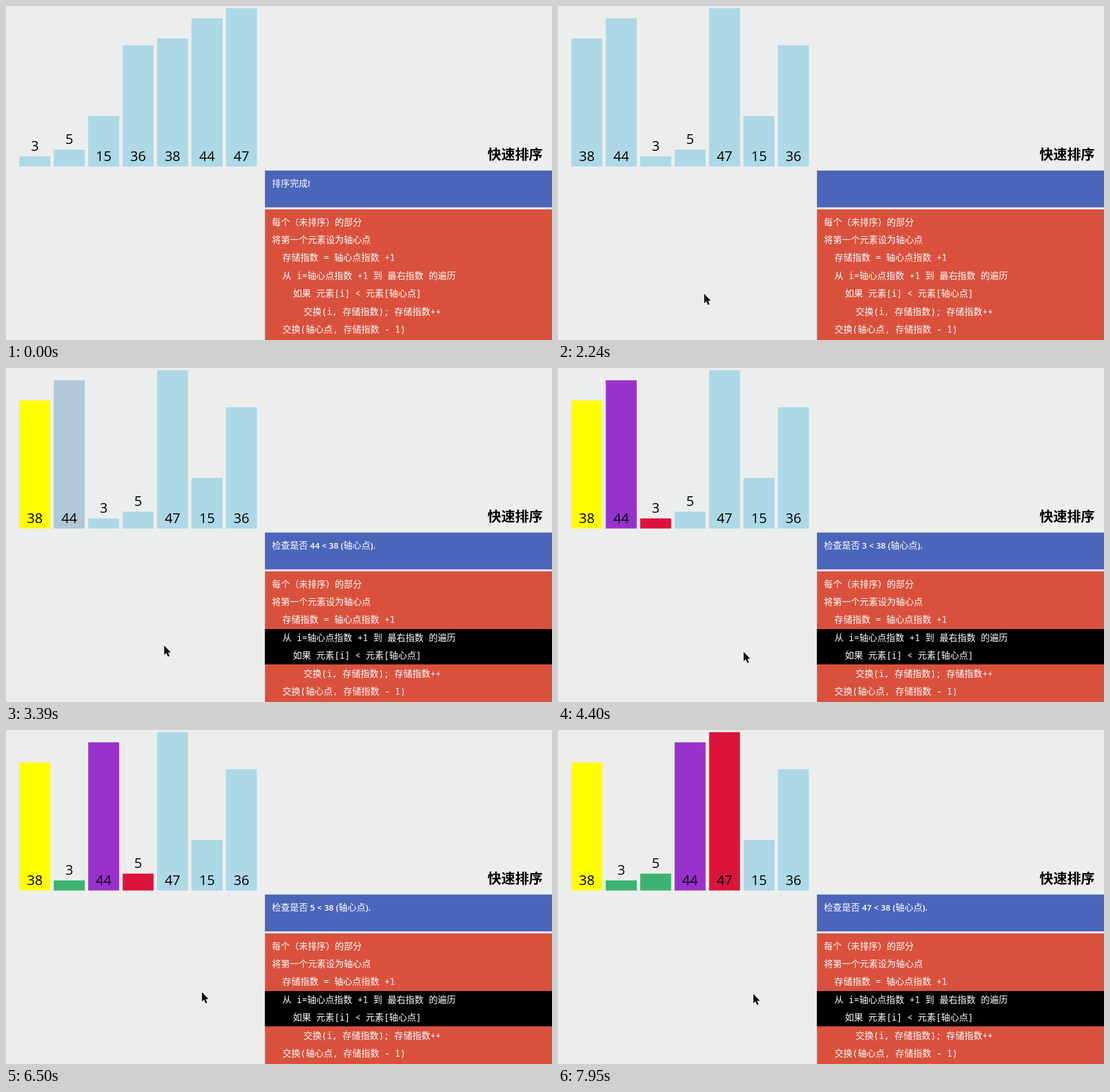
Animation, 956 px wide and 586 px high, one loop 8 s. Source, as an HTML page with a canvas:

```html
<!DOCTYPE html>
<html lang="zh-CN">
<head>
<meta charset="utf-8">
<title>快速排序</title>
<style>
html, body { margin: 0; width: 100%; height: 100%; overflow: hidden; background: #eceeed; }
canvas { display: block; }
</style>
</head>
<body>
<canvas id="stage" width="956" height="586"></canvas>
<script>
const ctx = document.getElementById('stage').getContext('2d');
const LOOP = 8000, TICK = 77, MOVE = 205;
const CJK_FONT = '"Noto Sans CJK SC", "Noto Sans CJK", sans-serif';

const BLUE = [173, 216, 230], YELLOW = [255, 255, 0], RED = [220, 20, 60],
      PURPLE = [153, 50, 204], GREEN = [60, 179, 113];

const CODE = [
  '每个（未排序）的部分',
  '将第一个元素设为轴心点',
  '  存储指数 = 轴心点指数 +1',
  '  从 i=轴心点指数 +1 到 最右指数 的遍历',
  '    如果 元素[i] < 元素[轴心点]',
  '      交换(i, 存储指数); 存储指数++',
  '  交换(轴心点, 存储指数 - 1)'
];

const VALUES = [38, 44, 3, 5, 47, 15, 36];
const TIMES = [0, 850, 2550, 3390, 4090, 5010, 5870, 6730, 7490];

// pointer tip: time, x, y
const PATH = [
  [1680, 70, 560], [1910, 223, 512], [2240, 256, 505], [2700, 277, 487],
  [4090, 277, 487], [4400, 325, 498], [4630, 334, 486], [5170, 326, 471],
  [5720, 343, 460], [7490, 343, 460], [7950, 342, 463]
];

const STEPS = partition();

// Runs the first pass of the sort and records every state it shows
function partition() {
  const steps = [], tint = {};
  let order = [...VALUES].sort((a, b) => a - b);
  const record = (text, lines) => steps.push({
    at: TIMES[steps.length], order: [...order], tint: { ...tint }, text, lines
  });

  record(['排序完成!'], []);
  order = [...VALUES];
  record([], []);

  const pivot = order[0];
  let store = 1;
  tint[pivot] = YELLOW;
  record([`正在处理部分 [0,6]. 选择 ${pivot} 作为轴心点.`, `(存储指数 = ${store}).`], [1, 2, 3]);

  for (let i = 1; steps.length < TIMES.length; i++) {
    const v = order[i], other = order[store];
    tint[v] = RED;
    record([`检查是否 ${v} < ${pivot} (轴心点).`], [4, 5]);
    if (v >= pivot) {
      tint[v] = PURPLE;
      continue;
    }
    [order[i], order[store]] = [other, v];
    record([
      `${v} < ${pivot} (轴心点) 是真（True）. 将指数为 ${i} (值 = {val}) 和在存储指数的`,
      `元素 (指数 = ${store}, 值 = ${other}) 进行交换. (交换过后在存储指数上的值 = {${++store}}).`
    ], [4, 6]);
    tint[v] = GREEN;
  }
  return steps;
}

const mix = (a, b, k) => a + (b - a) * k;
const ease = p => p >= 1 ? 1 : p < .5 ? 4 * p ** 3 : 1 - 4 * (1 - p) ** 3;

function box(x, y, w, h, color) {
  ctx.fillStyle = color;
  ctx.fillRect(x, y, w, h);
}

// Latin and Chinese runs use their own font
function write(text, x, y, latin, cjk) {
  for (const run of text.match(/[\u3000-\uffef]+|[^\u3000-\uffef]+/g)) {
    ctx.font = run.charCodeAt(0) >= 0x3000 ? cjk : latin;
    ctx.fillText(run, x, y);
    x += ctx.measureText(run).width;
  }
}

function drawBars(step, prev, k) {
  const base = 281.6;
  ctx.textAlign = 'center';
  ctx.font = '24px "Open Sans", "Noto Sans", sans-serif';
  for (const v of VALUES) {
    const slot = mix(prev.order.indexOf(v), step.order.indexOf(v), k);
    const x = 23.4 + slot * 60.28, h = v * 5.91;
    const from = prev.tint[v] || BLUE, to = step.tint[v] || BLUE;
    const rgb = from.map((c, i) => Math.round(mix(c, to[i], k)));
    box(x, base - h, 54.2, h, `rgb(${rgb})`);
    ctx.fillStyle = '#000';
    ctx.fillText(v, x + 27.1, h < 40 ? base - h - 10 : 272);
  }
  ctx.textAlign = 'left';
}

function drawPanels(step) {
  ctx.fillStyle = '#000';
  ctx.font = `bold 24.2px ${CJK_FONT}`;
  ctx.fillText('快速排序', 843, 269);

  box(453.4, 288.7, 503, 64.6, '#4b65ba');
  ctx.fillStyle = '#fff';
  step.text.forEach((s, i) => write(s, 465.5, 317 + i * 21,
    '600 14.8px "Open Sans", sans-serif', `500 15.75px ${CJK_FONT}`));

  box(453.4, 356.8, 503, 230, '#d9513c');
  const edge = n => Math.round(363.75 + n * 31.25);
  for (const n of step.lines) box(453.4, edge(n - 1), 503, edge(n) - edge(n - 1), '#000');
  ctx.fillStyle = '#fff';
  CODE.forEach((s, i) => write(s, 465.5, 384.6 + i * 31.4,
    '15.4px "Noto Sans Mono", monospace', `300 15.75px ${CJK_FONT}`));
}

function drawPointer(t) {
  const i = PATH.findLastIndex(p => p[0] <= t);
  if (i < 0) return;
  const a = PATH[i], b = PATH[i + 1] || [LOOP, a[1], a[2]];
  const k = (t - a[0]) / (b[0] - a[0]);
  ctx.save();
  ctx.translate(Math.round(mix(a[1], b[1], k)), Math.round(mix(a[2], b[2], k)));
  ctx.fillStyle = '#111';
  ctx.fill(new Path2D('M0 0V16.5L3.8 13L6.5 19.5L9.3 18.3L6.7 12.2L11.5 12Z'));
  ctx.restore();
}

function draw(t) {
  const n = STEPS.findLastIndex(s => s.at <= t);
  const step = STEPS[n], prev = STEPS[Math.max(0, n - 1)];
  // recolouring is already under way when it first shows; moves start at rest
  const lead = String(step.order) === String(prev.order) ? 57 : 0;
  const shown = lead + Math.floor((t - step.at) / TICK) * TICK;
  box(0, 0, 956, 586, '#eceeed');
  drawBars(step, prev, ease(shown / MOVE));
  drawPanels(step);
  drawPointer(t);
}

const begin = performance.now();
function loop() {
  draw((performance.now() - begin) % LOOP);
  requestAnimationFrame(loop);
}
loop();
</script>
</body>
</html>
```
